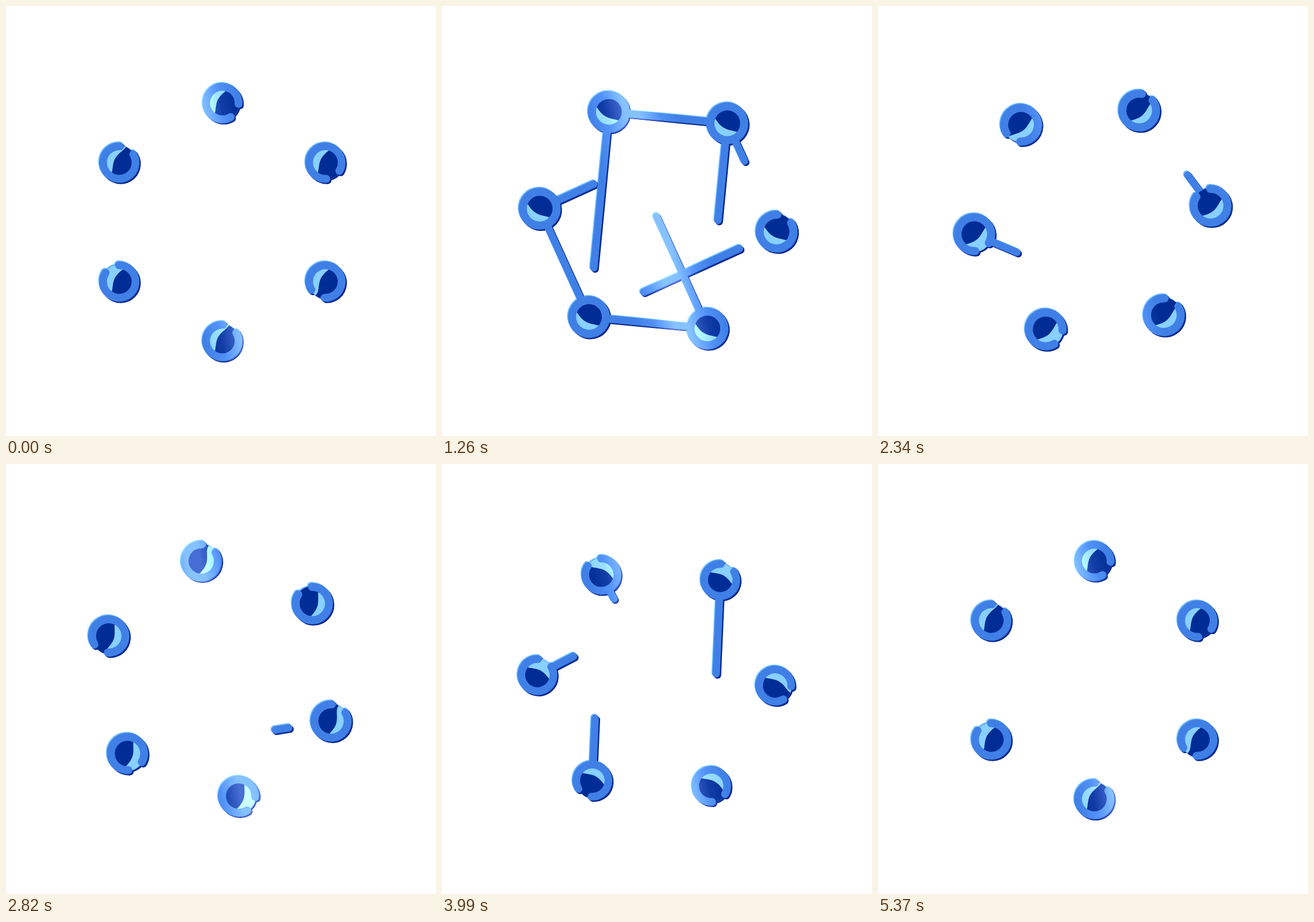
An HTML page with a canvas for the animation above (5400 ms loop, 748 px wide and 748 px high).

```html
<!DOCTYPE html>
<html lang="en">
<head>
<meta charset="utf-8">
<title>Turning network</title>
<style>
html, body { margin: 0; width: 100%; height: 100%; overflow: hidden; background: #fff; }
canvas { display: block; }
</style>
</head>
<body>
<canvas id="stage" width="748" height="748"></canvas>
<script>
const ctx = document.getElementById('stage').getContext('2d');
const SIZE = 748, STEP = 30, STEPS = 180, TURN = 5370;
const RAD = Math.PI / 180, ORBIT = 207;
const BLUE = '#4080e6', DARK = '#002c96', PALE = '#88d0ff';

// Direction of the opening in each ring, clockwise from the top.
const openings = [121, 149, 211, 31, 331, 31];

// Each line runs along nodes; head and tail are [time, distance] pairs.
const lines = [
  { path: [2, 0, 5, 4, 1], head: [[300, 0], [1260, 987], [1860, 1118], [2150, 1181]],
    tail: [[900, 0], [1260, 255], [1860, 987], [2200, 1181]] },
  { path: [4, 2, 1, 5], head: [[400, 0], [1260, 838], [1550, 920]],
    tail: [[1000, 0], [1260, 189], [1800, 920]] },
  { path: [3, 5], head: [[600, 0], [1260, 254], [1860, 281], [2150, 357]],
    tail: [[1100, 0], [1260, 71], [1860, 253], [2160, 357]] },
  { path: [2, 3, 4], head: [[1090, 0], [1260, 72], [1860, 344], [2050, 412]],
    tail: [[1700, 0], [1860, 66], [2450, 412]] },
  { path: [1, 5], head: [[2150, 0], [2820, 284], [3050, 357]],
    tail: [[2420, 0], [2820, 260], [3060, 357]] },
  { path: [3, 2, 1, 5], head: [[2900, 0], [3450, 662], [3800, 769]],
    tail: [[3300, 0], [3450, 70], [4150, 769]] },
  { path: [4, 2], head: [[3050, 0], [3450, 230], [3900, 357]],
    tail: [[3500, 0], [4200, 357]] },
  { path: [2, 0], head: [[3000, 0], [3450, 211], [3950, 357]],
    tail: [[3300, 0], [3450, 73], [4000, 357]] },
  { path: [5, 3], head: [[2950, 0], [3400, 357]],
    tail: [[3150, 0], [3450, 259], [3650, 357]] },
  { path: [3, 5], head: [[3800, 0], [4560, 284], [4850, 357]],
    tail: [[4150, 0], [4560, 257], [4860, 357]] },
  { path: [4, 1], head: [[3900, 0], [4560, 347], [4800, 412]],
    tail: [[4250, 0], [4560, 123], [5050, 412]] }
];

const clamp = x => Math.max(0, Math.min(1, x));

function sample(keys, t) {
  if (t <= keys[0][0]) return keys[0][1];
  for (let i = 1; i < keys.length; i++) {
    const [t0, v0] = keys[i - 1], [t1, v1] = keys[i];
    if (t <= t1) return v0 + (v1 - v0) * (t - t0) / (t1 - t0);
  }
  return keys[keys.length - 1][1];
}

function placeNodes(turn) {
  const c = Math.cos(turn), s = Math.sin(turn);
  const cx = 374.3 + 2 * c - 1.5 * s, cy = 374.3 + 2 * s + 1.5 * c;
  return openings.map((_, i) => {
    const a = turn + i * 60 * RAD;
    return { x: cx + ORBIT * Math.sin(a), y: cy - ORBIT * Math.cos(a) };
  });
}

function visibleParts(nodes, t) {
  const parts = [];
  for (const { path, head, tail } of lines) {
    const to = sample(head, t), from = sample(tail, t);
    let start = 0;
    for (let i = 1; i < path.length; i++) {
      const a = nodes[path[i - 1]], b = nodes[path[i]];
      const dx = b.x - a.x, dy = b.y - a.y, len = Math.hypot(dx, dy);
      const u = clamp((from - start) / len), v = clamp((to - start) / len);
      if (v > u) parts.push([a.x + dx * u, a.y + dy * u, a.x + dx * v, a.y + dy * v]);
      start += len;
    }
  }
  return parts;
}

function gapAt(i, t) {
  const [shut, open] = i === 3 ? [1450, 2150] : [650, 1550];
  const closed = Math.min(clamp((t - shut) / 250), clamp((open + 250 - t) / 250));
  return 28 * (1 - closed);
}

function drawBars(parts, color) {
  ctx.strokeStyle = color;
  ctx.lineWidth = 12.5;
  ctx.beginPath();
  for (const [x0, y0, x1, y1] of parts) {
    ctx.moveTo(x0, y0);
    ctx.lineTo(x1, y1);
  }
  ctx.stroke();
}

function drawRing(node, i, t, scale, color) {
  const gap = gapAt(i, t) * RAD, mid = (openings[i] - 90) * RAD;
  ctx.strokeStyle = color;
  ctx.lineWidth = 13.6 * scale;
  ctx.beginPath();
  ctx.arc(node.x, node.y, 28.6 * scale, mid + gap, mid + 2 * Math.PI - gap);
  ctx.stroke();
}

function fillDisc(x, y, r, color) {
  ctx.fillStyle = color;
  ctx.beginPath();
  ctx.arc(x, y, r, 0, 2 * Math.PI);
  ctx.fill();
}

function drawCore(node, turn, scale) {
  ctx.save();
  ctx.translate(node.x, node.y);
  ctx.scale(scale, scale);
  ctx.rotate(turn + 124.7 * RAD);
  fillDisc(0, 0, 30, DARK);
  ctx.beginPath();
  ctx.arc(0, 0, 30, 0, 2 * Math.PI);
  ctx.clip();
  ctx.fillStyle = PALE;
  ctx.beginPath();
  ctx.moveTo(-34, 7);
  ctx.bezierCurveTo(-26, 4, -18, 9, -8, 10);
  ctx.bezierCurveTo(4, 11.5, 12, 5, 21, 1);
  ctx.bezierCurveTo(25, -0.5, 30, 0, 34, 1);
  ctx.lineTo(34, 34);
  ctx.lineTo(-34, 34);
  ctx.fill();
  ctx.restore();
}

function drawRim(offset, color, nodes, parts, t, scale) {
  ctx.save();
  ctx.translate(offset, offset);
  drawBars(parts, color);
  nodes.forEach((n, i) => {
    fillDisc(n.x, n.y, 30 * scale, color);
    drawRing(n, i, t, scale, color);
  });
  ctx.restore();
}

function drawGlare() {
  const nx = Math.cos(13 * RAD) * 76, ny = -Math.sin(13 * RAD) * 76;
  const g = ctx.createLinearGradient(374 - nx, 374 - ny, 374 + nx, 374 + ny);
  const soft = 'rgb(18,17,16)', bright = 'rgb(70,66,62)';
  g.addColorStop(0, '#000');
  g.addColorStop(0.2, soft);
  g.addColorStop(0.42, bright);
  g.addColorStop(0.58, bright);
  g.addColorStop(0.8, soft);
  g.addColorStop(1, '#000');
  ctx.globalCompositeOperation = 'lighter';
  ctx.fillStyle = g;
  ctx.fillRect(0, 0, SIZE, SIZE);
  ctx.globalCompositeOperation = 'source-over';
}

function draw(t) {
  const turn = -2 * Math.PI * t / TURN;
  const scale = 1 + 0.03 * Math.sin(2 * Math.PI * (t / TURN - 0.08));
  const nodes = placeNodes(turn), parts = visibleParts(nodes, t);
  ctx.fillStyle = '#fff';
  ctx.fillRect(0, 0, SIZE, SIZE);
  ctx.lineCap = 'round';
  drawRim(-2, '#98e0ff', nodes, parts, t, scale);
  drawRim(2.5, '#001878', nodes, parts, t, scale);
  drawRim(-1.1, '#64a8f6', nodes, parts, t, scale);
  drawRim(1.2, '#1440b0', nodes, parts, t, scale);
  drawBars(parts, BLUE);
  nodes.forEach((n, i) => {
    drawCore(n, turn, scale);
    drawRing(n, i, t, scale, BLUE);
  });
  drawGlare();
}

function tick() {
  draw(Math.floor(performance.now() / STEP) % STEPS * STEP);
  requestAnimationFrame(tick);
}
tick();
</script>
</body>
</html>
```
